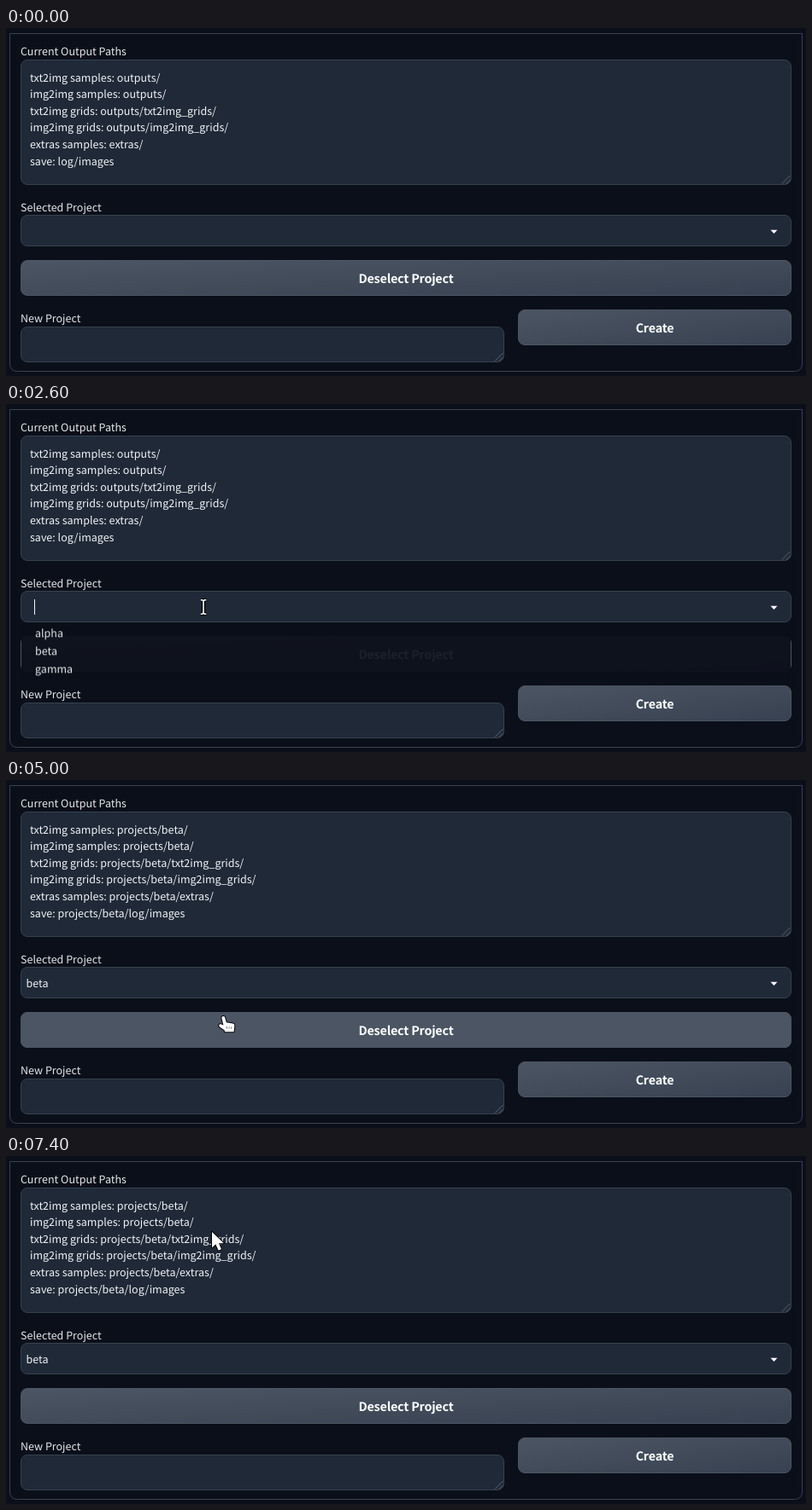
Animation of 936 by 408 pixels, one loop 8 s. Source, as an HTML page:

```html
<!DOCTYPE html>
<html lang="en">
<head>
<meta charset="utf-8">
<title>Project paths</title>
<style>
  html, body { margin: 0; width: 100%; height: 100%; overflow: hidden; background: #0b0f19; }
  svg { display: block; width: 100%; height: 100%; }
  text {
    font: 12.53px "Noto Sans CJK JP", "Noto Sans CJK SC", "Noto Sans CJK KR", "Noto Sans CJK TC", "Noto Sans", sans-serif;
    fill: #f3f4f6;
    text-rendering: geometricPrecision;
  }
  .label { fill: #e5e7eb; }
  .caption { font-size: 14.3px; font-weight: 600; letter-spacing: -.18px; text-anchor: middle; fill: #fff; }
  .timer { font: 12px "Liberation Mono", monospace; }
  .line { fill: none; stroke: #374151; }
  .field { fill: #1f2937; stroke: #374151; }
  .button { fill: url(#shade); stroke: #4b5563; }
  .hover { fill: #4b5563; stroke: #4b5563; }
  .grip { fill: none; stroke: #606976; stroke-width: .9; }
  .shape { fill: #fff; stroke: #000; stroke-width: 2; stroke-linejoin: round; paint-order: stroke; }

  /* Everything moves in 100 ms steps: 1.25% of the loop */
  .anim { animation: 8s step-end infinite; }
  #before { animation-name: before; }
  #after { animation-name: after; }
  #chosen { animation-name: chosen; }
  #loader { animation-name: loader; }
  #caret { animation-name: caret; }
  #menu { animation-name: menu; }
  #row { animation-name: row; }
  #hoverCreate { animation-name: hoverCreate; }
  #hoverDeselect { animation-name: hoverDeselect; }
  #pointer { animation-name: pointer; }
  #beam { animation-name: beam; }
  #hand { animation-name: hand; }
  #arrow { animation-name: arrow; }

  @keyframes before { 0% { opacity: 1 } 62.5%, 100% { opacity: 0 } }
  @keyframes after { 0% { opacity: 0 } 62.5%, 100% { opacity: 1 } }
  @keyframes chosen { 0% { opacity: 0 } 61.25%, 100% { opacity: 1 } }
  @keyframes loader { 0%, 62.5%, 100% { opacity: 0 } 61.25% { opacity: 1 } }
  @keyframes caret {
    0%, 18.75%, 33.75%, 61.25%, 100% { opacity: 0 }
    17.5%, 32.5%, 48.75% { opacity: 1 }
  }
  @keyframes menu {
    0%, 18.75%, 62.5%, 100% { opacity: 0; transform: translateY(5px) }
    17.5% { opacity: .1; transform: translateY(4.5px) }
    32.5% { opacity: .93; transform: translateY(.3px) }
    33.75% { opacity: 1; transform: none }
    61.25% { opacity: .5; transform: translateY(2.7px) }
  }
  @keyframes row {
    0%, 62.5%, 100% { opacity: 0; transform: none }
    40% { opacity: 1; transform: none }
    47.5% { opacity: 1; transform: translateY(21px) }
  }
  @keyframes hoverCreate { 0%, 8.75%, 100% { opacity: 0 } 7.5% { opacity: 1 } }
  @keyframes hoverDeselect {
    0%, 10%, 86.25%, 100% { opacity: 0 }
    8.75%, 62.5% { opacity: 1 }
    11.25% { opacity: 0 }
  }
  @keyframes beam {
    0%, 40%, 88.75%, 100% { opacity: 0 }
    11.25%, 87.5% { opacity: 1 }
  }
  @keyframes hand {
    0%, 10%, 86.25%, 100% { opacity: 0 }
    7.5%, 40% { opacity: 1 }
  }
  @keyframes arrow {
    0%, 11.25%, 87.5% { opacity: 0 }
    10%, 86.25%, 88.75%, 100% { opacity: 1 }
  }
  @keyframes pointer {
    0%, 7.5% { transform: translate(650px, 362px) }
    8.75% { transform: translate(500px, 305px) }
    10% { transform: translate(345px, 261px) }
    11.25% { transform: translate(255px, 240px) }
    12.5% { transform: translate(230px, 231px) }
    27.5% { transform: translate(230px, 234px) }
    28.75% { transform: translate(231px, 238px) }
    37.5% { transform: translate(231px, 241px) }
    38.75% { transform: translate(231px, 247px) }
    40% { transform: translate(230px, 259px) }
    41.25% { transform: translate(230px, 264px) }
    42.5% { transform: translate(227px, 269px) }
    43.75% { transform: translate(220px, 273px) }
    45% { transform: translate(210px, 276px) }
    46.25% { transform: translate(200px, 278px) }
    47.5% { transform: translate(194px, 279px) }
    62.5% { transform: translate(255px, 276px) }
    63.75% { transform: translate(347px, 269px) }
    65% { transform: translate(374px, 277px) }
    66.25% { transform: translate(382px, 288px) }
    67.5% { transform: translate(382px, 294px) }
    68.75% { transform: translate(380px, 296px) }
    77.5% { transform: translate(377px, 293px) }
    78.75% { transform: translate(374px, 290px) }
    85% { transform: translate(371px, 284px) }
    86.25% { transform: translate(357px, 262px) }
    87.5% { transform: translate(330px, 230px) }
    88.75% { transform: translate(297px, 192px) }
    90% { transform: translate(267px, 146px) }
    91.25% { transform: translate(248px, 106px) }
    92.5%, 100% { transform: translate(240px, 87px) }
  }
</style>
</head>
<body>
<svg viewBox="0 0 936 408">
  <defs>
    <linearGradient id="shade" x1="0" y1="0" x2="1" y2="1">
      <stop stop-color="#4b5563"/>
      <stop offset="1" stop-color="#374151"/>
    </linearGradient>
    <path id="grip" class="grip" d="M-11-1.5L-1.5-11M-6-1.5L-1.5-6"/>
    <path id="stem" d="M-3.2-8.2h2L0-7.2 1.2-8.2h2M-3.2 8.2h2L0 7.2 1.2 8.2h2M0-7.2V7.2"/>
  </defs>

  <path class="line" d="M4.5 6.5h927v388a8 8 0 0 1-8 8h-911a8 8 0 0 1-8-8z"/>

  <text class="label" x="17" y="32">Current Output Paths</text>
  <rect class="field" x="17.5" y="37.5" width="901" height="146" rx="7.5"/>
  <use href="#grip" x="919" y="184"/>

  <g id="before" class="anim">
    <text x="28" y="63">txt2img samples: outputs/</text>
    <text x="28" y="82">img2img samples: outputs/</text>
    <text x="28" y="102">txt2img grids: outputs/txt2img_grids/</text>
    <text x="28" y="121">img2img grids: outputs/img2img_grids/</text>
    <text x="28" y="141">extras samples: extras/</text>
    <text x="28" y="161">save: log/images</text>
  </g>
  <g id="after" class="anim">
    <text x="28" y="63">txt2img samples: projects/beta/</text>
    <text x="28" y="82">img2img samples: projects/beta/</text>
    <text x="28" y="102">txt2img grids: projects/beta/txt2img_grids/</text>
    <text x="28" y="121">img2img grids: projects/beta/img2img_grids/</text>
    <text x="28" y="141">extras samples: projects/beta/extras/</text>
    <text x="28" y="161">save: projects/beta/log/images</text>
  </g>

  <g id="loader" class="anim">
    <rect x="17" y="14" width="902" height="170" rx="10" fill="#0b0f19"/>
    <circle cx="467" cy="100" r="6.5" fill="#f97316"/>
    <text class="timer" x="882" y="34">0.1s</text>
  </g>

  <text class="label" x="17" y="215">Selected Project</text>
  <rect class="field" x="17.5" y="219.5" width="901" height="36" rx="7.5"/>
  <path fill="#fff" d="M894.5 236.8h8l-4 4.2z"/>
  <text id="chosen" class="anim" x="23.5" y="243">beta</text>
  <rect id="caret" class="anim" x="33" y="229" width="1" height="18" fill="#f3f4f6"/>

  <rect class="button" x="17.5" y="272.5" width="901" height="41" rx="7.5"/>
  <rect id="hoverDeselect" class="hover anim" x="17.5" y="272.5" width="901" height="41" rx="7.5"/>
  <text class="caption" x="468" y="299">Deselect Project</text>

  <text class="label" x="17" y="345">New Project</text>
  <rect class="field" x="17.5" y="350.5" width="565" height="41" rx="7.5"/>
  <use href="#grip" x="583" y="392"/>

  <rect class="button" x="599.5" y="330.5" width="319" height="41" rx="7.5"/>
  <rect id="hoverCreate" class="hover anim" x="599.5" y="330.5" width="319" height="41" rx="7.5"/>
  <text class="caption" x="759" y="357">Create</text>

  <g id="menu" class="anim">
    <rect x="18" y="257" width="900" height="64" fill="#0b0f19"/>
    <rect id="row" class="anim" x="18" y="258" width="900" height="21" fill="#111827"/>
    <text x="34" y="273">alpha</text>
    <text x="34" y="294">beta</text>
    <text x="34" y="315">gamma</text>
  </g>

  <g id="pointer" class="anim">
    <g id="beam" class="anim" fill="none" stroke-linejoin="round">
      <use href="#stem" stroke="#000" stroke-width="4.2"/>
      <use href="#stem" stroke="#fff" stroke-width="1.6"/>
    </g>
    <g id="hand" class="anim">
      <path class="shape" d="M-2.6 3.2C-3 .6 .5 .2 1.2 2.4L2.8 8.2 10.4 9.4C12 9.8 12.5 10.8 12.3 12.4L11.6 19.2H.8V17.4L-5 13.4C-6.8 11.7-5 9.6-3 10.6L-.6 11.6z"/>
      <path fill="none" stroke="#555" stroke-width=".8" d="M3.4 13v2.6M6 13.2v2.4M8.6 13.4v2.2"/>
    </g>
    <path id="arrow" class="shape anim" d="M1 2V20.5L5.3 16.6 8.6 23.8 12 22.3 8.9 15.3H14.8z"/>
  </g>
</svg>
</body>
</html>
```
